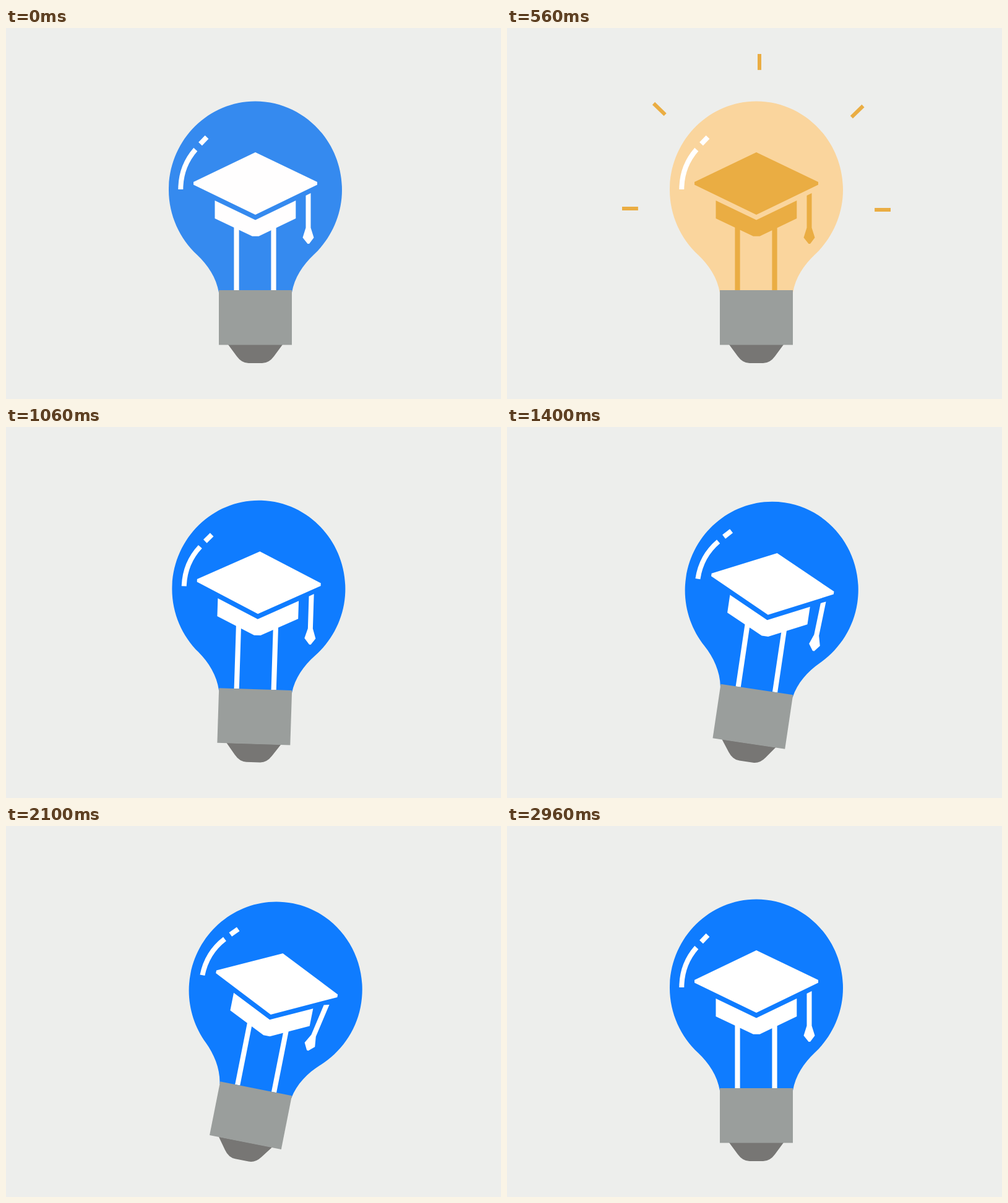
Recreate the animation shown at these times as an HTML page. Size 800 px wide and 600 px high, loop 3000 ms.

```html
<!DOCTYPE html>
<html lang="en">
<head>
<meta charset="utf-8">
<title>Bright idea</title>
<style>
  html, body { margin: 0; width: 100%; height: 100%; overflow: hidden; background: #edeeec; }
  svg { display: block; width: 100vw; height: 100vh; }
</style>
</head>
<body>
<svg viewBox="0 0 800 600">
  <g id="rays" stroke="#eaad43" stroke-width="6"></g>
  <g id="lamp">
    <path id="glass" d="M403 118.5C325.7 118.5 263 182.7 263 262C263 303 281 341 309 367C326 383 340 404 344 428H462C466 404 480 383 497 367C525 341 543 303 543 262C543 182.7 480.3 118.5 403 118.5Z"/>
    <g fill="none" stroke="#fff" stroke-width="8">
      <path d="M282.3 261C282.3 236 291 214 306.3 196.5"/>
      <path d="M314 187.5L324.5 176.5"/>
    </g>
    <g id="wires">
      <path d="M368.4 318h8.2v106h-8.2zM428.4 318h8.2v106h-8.2z"/>
      <path id="tassel" d="M484.5 271L492.5 267V323L497.5 339L490 349H487.5L479.5 339L484.5 323Z"/>
    </g>
    <g id="cap">
      <path d="M337.5 279L403 310.5L468.3 279V308L408.5 336.8H398L337.5 308Z"/>
      <path d="M403 201L503 249V253.5L403 302L303 253.5V249Z"/>
    </g>
    <path fill="#777674" d="M359 512H447L433 531Q425 542 414 542H392Q381 542 373 531Z"/>
    <path fill="#9a9e9c" d="M344 424h118v88.5h-118z"/>
  </g>
</svg>
<script>
const LOOP = 3000, RAY_LENGTH = 45;
const BLUE = [15, 124, 255], PALE = [250, 213, 157];
const WHITE = [255, 255, 255], AMBER = [234, 173, 67];
const byId = id => document.getElementById(id);
const [glass, wires, cap, lamp, tassel, rayGroup] =
  ['glass', 'wires', 'cap', 'lamp', 'tassel', 'rays'].map(byId);

// Outer tip and outward direction of each ray
const rays = [
  [408, 42, 0, -1], [237, 122, -.72, -.7], [575.5, 126, .72, -.7],
  [186, 292, -1, 0], [620, 294, 1, 0]
].map(([x, y, dx, dy]) => {
  const line = document.createElementNS('http://www.w3.org/2000/svg', 'line');
  rayGroup.append(line);
  return { line, x, y, dx, dy };
});

// Time, tilt in degrees, degrees per ms
const swing = [
  [826, 0, 0], [1343, 7.2, .0219], [1860, 14.35, 0], [2160, 10.2, -.0155],
  [2400, 6.3, -.018], [2730, .45, -.005], [2930, 0, 0]
];

const ramp = (t, a, b) => Math.min(1, Math.max(0, (t - a) / (b - a)));
const smooth = u => u * u * (3 - 2 * u);

function tilt(t) {
  const i = swing.findIndex(key => key[0] > t);
  if (i < 1) return 0;
  const [t0, v0, m0] = swing[i - 1], [t1, v1, m1] = swing[i];
  const h = t1 - t0, u = (t - t0) / h;
  return v0 + (v1 - v0) * smooth(u) + h * u * (1 - u) * (m0 * (1 - u) - m1 * u);
}

function paint(el, cold, warm, t, on, off) {
  const s = t > 2000 ? t - LOOP : t;
  const k = ramp(s, on, on + 150) - ramp(s, off, off + 167);
  el.setAttribute('fill', `rgb(${cold.map((c, i) => Math.round(c + (warm[i] - c) * k))})`);
}

function drawRays(t) {
  const tip = RAY_LENGTH * (1 - smooth(ramp(t, 150, 480)));
  const tail = RAY_LENGTH * (1 - smooth(ramp(t, 390, 770)));
  rayGroup.style.display = tail > tip ? '' : 'none';
  for (const { line, x, y, dx, dy } of rays) {
    line.setAttribute('x1', x - dx * tip);
    line.setAttribute('y1', y - dy * tip);
    line.setAttribute('x2', x - dx * tail);
    line.setAttribute('y2', y - dy * tail);
  }
}

function draw(t) {
  paint(glass, BLUE, PALE, t, -23, 617);
  paint(wires, WHITE, AMBER, t, -20 + 20, 613);
  paint(cap, WHITE, AMBER, t, -20 + 20, 658);
  drawRays(t);
  lamp.setAttribute('transform', `rotate(${tilt(t)} 400 430)`);
  const lag = 12 * Math.sin(Math.PI * ramp(t, 1080, 2920)) ** 2;
  tassel.setAttribute('transform', `rotate(${lag} 488.5 269)`);
}

const start = performance.now();
function frame() {
  draw((performance.now() - start) % LOOP);
  requestAnimationFrame(frame);
}
frame();
</script>
</body>
</html>
```
